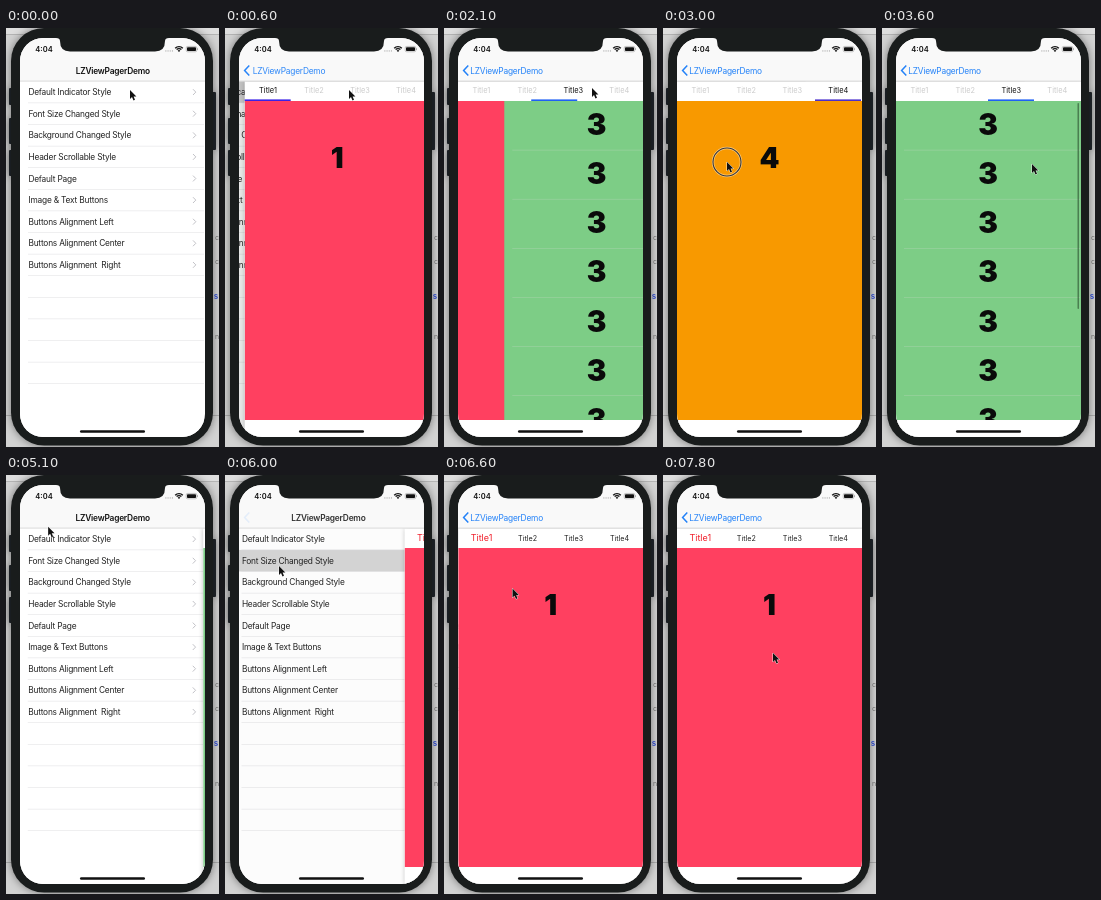
Recreate the animation shown at these times as an HTML page with a canvas. Size 213 by 419 pixels, loop 8000 ms.

```html
<!DOCTYPE html>
<html lang="en">
<head>
<meta charset="utf-8">
<title>Pager demo</title>
<style>
html, body { margin: 0; width: 100%; height: 100%; overflow: hidden; background: #d2d2d2; }
canvas { display: block; width: 100vw; height: 100vh; }
</style>
</head>
<body>
<canvas></canvas>
<script>
const W = 213, H = 419, LOOP = 8000, STEP = 300;
const LEFT = 14, WIDTH = 184, MID = LEFT + WIDTH / 2, TOP = 53.3, ROW = 21.6, TAB = 46;
const BLUE = '#2382f8', BODY = '#191c1c';
const ROWS = ['Default Indicator Style', 'Font Size Changed Style', 'Background Changed Style',
  'Header Scrollable Style', 'Default Page', 'Image & Text Buttons', 'Buttons Alignment Left',
  'Buttons Alignment Center', 'Buttons Alignment  Right'];
const BARS = ['#3a22e6', '#2a48e8', '#2060f5', '#4a2fcc'];
const PAGES = ['#ff4060', '#ff4060', '#7dcd86', '#f89900'];
const PUSH = 220, POP = 4560, PUSH2 = 5962;
// start, from page, to page
const MOVES = [[1831, 0, 2], [2380, 2, 3], [3010, 3, 2]];
// time, x, y
const POINTER = [[0, 124, 62], [900, 124, 62], [1800, 148, 60], [2100, 148, 60], [2400, 174, 61],
  [2550, 174, 61], [3000, 64, 134], [3300, 150, 136], [3600, 150, 136], [4500, 38, 38],
  [4800, 38, 38], [5700, 54, 91], [6300, 54, 91], [7200, 110, 178], [8000, 110, 178]];

const canvas = document.querySelector('canvas');
const c = canvas.getContext('2d');
const clamp = v => Math.max(0, Math.min(1, v));
const smooth = v => (v = clamp(v), v * v * (3 - 2 * v));
const mix = (a, b, k) => a + (b - a) * k;
const spring = ms => ms <= 0 ? 0 : 1 - (1 + ms * .014) * Math.exp(-ms * .014);

function rect(x, y, w, h, color) {
  c.fillStyle = color;
  c.fillRect(x, y, w, h);
}
function round(x, y, w, h, r, color) {
  c.fillStyle = color;
  c.beginPath();
  c.roundRect(x, y, w, h, r);
  c.fill();
}
function line(points, color, width) {
  c.strokeStyle = color;
  c.lineWidth = width;
  c.beginPath();
  points.forEach(([x, y]) => c.lineTo(x, y));
  c.stroke();
}
// y is the middle of the capitals
function text(s, x, y, size, color, weight = 400, align = 'center', track = 0) {
  c.font = `${weight} ${size}px Inter, "Liberation Sans", sans-serif`;
  c.letterSpacing = track * size + 'px';
  c.textAlign = align;
  c.fillStyle = color;
  c.fillText(s, x, y + size * .364);
}
function faded(alpha, draw) {
  c.save();
  c.globalAlpha *= clamp(alpha);
  draw();
  c.restore();
}
function clipped(x, y, w, h, draw) {
  c.save();
  c.beginPath();
  c.rect(x, y, w, h);
  c.clip();
  draw();
  c.restore();
}

function backdrop() {
  rect(0, 0, W, H, '#d2d2d2');
  rect(0, 0, W, 6, '#dedede');
  rect(0, 6, W, 1, '#b4b4b4');
  rect(0, 387, W, 1, '#acacac');
  for (const [s, y] of [['c', 209], ['c', 233], ['n', 308]]) text(s, 211, y, 7, '#777');
  text('s', 210, 268, 8, '#2b49d8', 600);
  c.save();
  c.shadowColor = 'rgba(0,0,0,.45)';
  c.shadowBlur = 8;
  for (const [x, y, h] of [[3, 60, 17], [3, 90, 26], [3, 122, 26], [205, 64, 58]])
    round(x, y, 5, h, 1, '#20252a');
  round(5, 0, 202, 417.5, 33, BODY);
  c.restore();
}

function list(x, glowRow, glow) {
  rect(x, TOP, WIDTH, 356, '#fff');
  if (glow > 0) faded(glow, () => rect(x, TOP + glowRow * ROW, WIDTH, ROW, '#d6d6d6'));
  for (let i = 1; i < 15; i++) rect(x + 8, TOP + i * ROW - .25, WIDTH - 8, .5, '#dedee0');
  ROWS.forEach((s, i) => {
    const y = TOP + (i + .5) * ROW;
    text(s, x + 8.4, y, 8.34, '#222', 400, 'left', -.024);
    line([[x + 173, y - 2.9], [x + 175.8, y], [x + 173, y + 2.9]], '#c3c3c8', 1);
  });
}

function content(i, x, thumb) {
  rect(x, 73, WIDTH + 1, 319, PAGES[i]);
  if (i !== 2) return text(i + 1, x + 92.5, 130, 28.5, '#0a0a0a', 900);
  for (let k = 0; k < 7; k++) {
    const y = 73 + k * 49.1;
    text(3, x + 92.2, y + 23.4, 29.4, '#0a0a0a', 900);
    rect(x + 8, y + 48.8, WIDTH - 8, .6, 'rgba(200,215,200,.45)');
  }
  if (thumb) round(x + 181.5, 75, 1.5, 206, .7, 'rgba(40,75,45,.6)');
}

function pager(x, t) {
  const large = t >= PUSH2;
  const [start, from, to] = large ? [0, 0, 0] : MOVES.findLast(m => t >= m[0]) || [0, 0, 0];
  const k = (t - start) / 400, q = smooth(k);
  c.save();
  c.shadowColor = 'rgba(0,0,0,.3)';
  c.shadowBlur = 5;
  rect(x, TOP, WIDTH + 1, 357, '#fff');
  c.restore();
  for (let i = 0; i < 4; i++) {
    const on = i === to, tx = x + TAB * (i + .5);
    if (large) text('Title' + (i + 1), tx + .3, 63, on ? 9 : 7.2, on ? '#f0202c' : '#222');
    else text('Title' + (i + 1), tx + .3, 62.5, 7.4, on ? '#111' : '#cbcbcb');
  }
  if (!large) rect(x + TAB * mix(from, to, smooth(k * 1.055)), 71.4, TAB, 1.6, BARS[to]);
  clipped(x, 73, WIDTH + 1, 319, () => {
    const dir = Math.sign(to - from);
    if (dir && q < 1) content(from, x - dir * q * WIDTH);
    content(to, x + dir * (1 - q) * WIDTH, t >= 3600);
  });
}

function navBar(p, pressed) {
  rect(LEFT, 9, WIDTH + 1, TOP - 9, '#f9f9f9');
  rect(LEFT, TOP - .5, WIDTH + 1, .5, '#b8b8bb');
  const shift = 43 * p, name = 'LZViewPagerDemo';
  faded(1 - p * 1.4, () => text(name, MID + .8 - shift * .8, 43, 8.34, '#111', 600, 'center', -.024));
  faded(pressed ? .22 : p, () =>
    line([[24.3, 37.6], [19.6, 42.5], [24.3, 47.4]], BLUE, 1.5));
  faded(pressed ? .22 : p * 1.6 - .6, () =>
    text(name, MID - .4 - shift, 43, 8.34, BLUE, 400, 'center', -.024));
}

function notch() {
  c.fillStyle = BODY;
  c.beginPath();
  c.moveTo(50, 8);
  c.lineTo(50, 10);
  c.quadraticCurveTo(54, 10, 54, 13);
  c.quadraticCurveTo(54, 23.5, 64, 23.5);
  c.lineTo(149, 23.5);
  c.quadraticCurveTo(159, 23.5, 159, 13);
  c.quadraticCurveTo(159, 10, 163, 10);
  c.lineTo(163, 8);
  c.fill();
}

function statusBar() {
  text('4:04', 38, 21, 7.5, '#111', 600);
  for (let i = 0; i < 4; i++) rect(159.3 + i * 2.2, 22.4, 1.1, 1.1, '#aaa');
  for (const r of [1.2, 3.4, 5.4]) {
    c.strokeStyle = '#111';
    c.lineWidth = 1.4;
    c.beginPath();
    c.arc(173, 24, r, -Math.PI * .75, -Math.PI * .25);
    c.stroke();
  }
  c.strokeStyle = '#888';
  c.lineWidth = .5;
  c.beginPath();
  c.roundRect(180.2, 18.4, 10.6, 5.4, 1.5);
  c.stroke();
  round(181, 19.2, 9, 3.8, .8, '#111');
  rect(191.3, 20.2, .6, 1.8, '#888');
}

function pointer(t, pressed) {
  const n = Math.max(1, POINTER.findIndex(k => k[0] > t));
  const a = POINTER[n - 1], b = POINTER[n], k = smooth((t - a[0]) / (b[0] - a[0]));
  const x = mix(a[1], b[1], k), y = mix(a[2], b[2], k);
  if (pressed) {
    c.beginPath();
    c.arc(x, y, 14, 0, 7);
    c.strokeStyle = 'rgba(255,255,255,.5)';
    c.lineWidth = 2.4;
    c.stroke();
    c.strokeStyle = '#333';
    c.lineWidth = 1.1;
    c.stroke();
  }
  c.beginPath();
  for (const [dx, dy] of [[0, 0], [0, 9], [2, 7.1], [3.5, 10.5], [5, 9.8], [3.6, 6.6], [6.4, 6.4]])
    c.lineTo(x + dx, y + dy);
  c.closePath();
  c.strokeStyle = 'rgba(255,255,255,.8)';
  c.lineWidth = 1;
  c.stroke();
  c.fillStyle = '#111';
  c.fill();
}

function draw(t) {
  const p = spring(t - PUSH) - spring(t - POP) + spring(t - PUSH2);
  const backDown = t >= 4500 && t < 4600, dragging = t >= 3000 && t < 3400;
  const glow = t >= 5900 ? 1 : t < 200 ? 0 : 1 - spring(t - POP);
  const pageX = LEFT + WIDTH * (1 - p);
  backdrop();
  c.save();
  c.beginPath();
  c.roundRect(LEFT, 10, WIDTH + 1, 399, 23);
  c.clip();
  rect(LEFT, 9, WIDTH + 1, 401, '#fff');
  list(LEFT - .3 * WIDTH * p, t >= 5700 ? 1 : 0, glow);
  if (p > .001) {
    rect(LEFT, TOP, WIDTH + 1, 357, `rgba(0,0,0,${.1 * p})`);
    pager(pageX, t);
  }
  navBar(p, backDown);
  c.restore();
  notch();
  statusBar();
  round(74, 402.3, 65, 2.4, 1.2, '#111');
  pointer(t, backDown || dragging);
}

function tick(now) {
  const d = devicePixelRatio || 1, w = Math.round(innerWidth * d), h = Math.round(innerHeight * d);
  if (canvas.width !== w || canvas.height !== h) {
    canvas.width = w;
    canvas.height = h;
  }
  c.setTransform(w / W, 0, 0, h / H, 0, 0);
  draw(Math.floor(now % LOOP / STEP) * STEP);
  requestAnimationFrame(tick);
}
requestAnimationFrame(tick);
</script>
</body>
</html>
```
